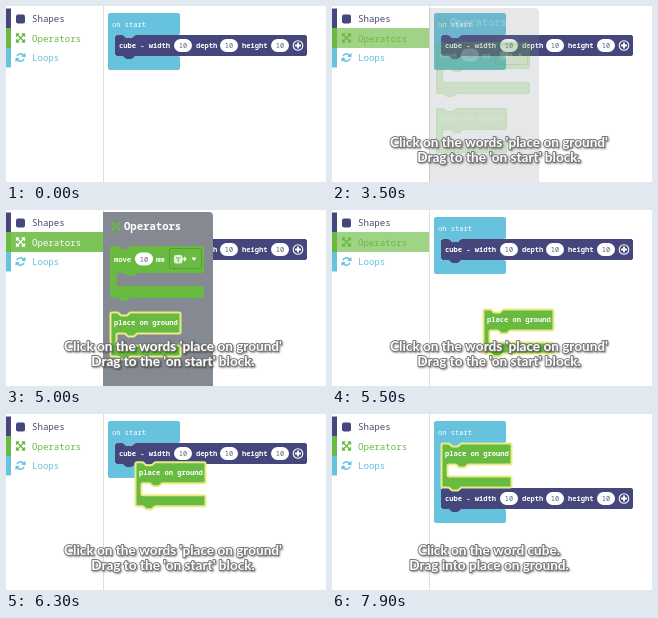
An HTML page with a canvas for the animation above (8 s loop, 320 by 176 pixels).

```html
<!DOCTYPE html>
<html lang="en">
<head>
<meta charset="utf-8">
<title>Block coding lesson</title>
<style>
html, body { margin: 0; width: 100%; height: 100%; overflow: hidden; background: #fff; }
canvas { display: block; width: 320px; height: 176px; }
</style>
</head>
<body>
<canvas id="stage"></canvas>
<script>
const LOOP = 8000;
const NAVY = '#45477c', GREEN = '#69ba40', CYAN = '#66c2dd', YELLOW = '#e9ec86';
const MONO = '"Noto Sans Mono", "DejaVu Sans Mono", monospace';
const canvas = document.getElementById('stage');
const ctx = canvas.getContext('2d');
const dpr = window.devicePixelRatio || 1;
canvas.width = 320 * dpr;
canvas.height = 176 * dpr;

// time, x, y of the dragged block
const DRAG = [
  [5150, 104, 102], [5300, 130, 103], [5500, 151, 99], [6000, 135, 62],
  [6400, 127, 43], [6800, 119, 29], [7050, 117, 29], [7120, 109, 29]
];

const ramp = (t, a, b) => Math.min(1, Math.max(0, (t - a) / (b - a)));
const mix = (a, b, k) => a + (b - a) * k;

function along(keys, t) {
  for (let i = 1; i < keys.length; i++) {
    const [t0, x0, y0] = keys[i - 1], [t1, x1, y1] = keys[i];
    if (t < t1) {
      const k = ramp(t, t0, t1);
      return [mix(x0, x1, k), mix(y0, y1, k)];
    }
  }
  return keys[keys.length - 1].slice(1);
}

function faded(alpha, draw) {
  if (alpha <= 0) return;
  ctx.save();
  ctx.globalAlpha = alpha;
  draw();
  ctx.restore();
}

function text(s, x, y, size, color, weight = 500, align = 'left') {
  ctx.font = `${weight} ${size}px ${MONO}`;
  ctx.textAlign = align;
  ctx.fillStyle = color;
  ctx.fillText(s, x, y);
}

function rect(x, y, w, h, color, r = 0) {
  ctx.fillStyle = color;
  ctx.beginPath();
  ctx.roundRect(x, y, w, h, r);
  ctx.fill();
}

function lines(color, width, ...paths) {
  ctx.strokeStyle = color;
  ctx.lineWidth = width;
  ctx.beginPath();
  for (const [first, ...rest] of paths) {
    ctx.moveTo(...first);
    for (const p of rest) ctx.lineTo(...p);
  }
  ctx.stroke();
}

function roundedPath(pts, r) {
  const last = pts[pts.length - 1];
  ctx.beginPath();
  ctx.moveTo((last[0] + pts[0][0]) / 2, (last[1] + pts[0][1]) / 2);
  pts.forEach((p, i) => ctx.arcTo(...p, ...pts[(i + 1) % pts.length], r));
  ctx.closePath();
}

const notch = (x, y) => [[x + 8, y], [x + 11, y + 3], [x + 17, y + 3], [x + 20, y]];

// A block; with a mouth it becomes a C that wraps other blocks.
function block(x, y, w, top, color, { mouth = 0, foot = 0, joins = true, edge = color } = {}) {
  const arm = x + 7, lip = y + top, jaw = lip + mouth, end = jaw + foot;
  const left = x + .5, right = x + w - .5;
  const pts = [[left, y + .5], ...(joins ? notch(x, y + .5) : []), [right, y + .5]];
  if (mouth) {
    pts.push([right, lip - .5], ...notch(arm, lip - .5).reverse(),
      [arm - .5, lip - .5], [arm - .5, jaw + .5], [right, jaw + .5]);
  }
  pts.push([right, end - .5], ...(joins ? notch(x, end - .5).reverse() : []), [left, end - .5]);
  roundedPath(pts, 1.5);
  ctx.fillStyle = color;
  ctx.fill();
  ctx.strokeStyle = edge;
  ctx.lineWidth = edge === color ? 1 : 2;
  ctx.stroke();
}

function pill(cx, cy) {
  rect(cx - 9, cy - 6.5, 18, 13, '#fff', 6.5);
  text('10', cx, cy + 2.5, 7, '#5b5d78', 500, 'center');
}

function startBlock(mouth) {
  block(102, 7, 72, 22, CYAN, { mouth, foot: 14, joins: false });
  text('on start', 106, 20.5, 7.1, '#fff');
}

function cubeBlock(y) {
  block(109, y, 192, 21, NAVY);
  const base = y + 13, cy = y + 10.5;
  text('cube - width', 113, base, 7.1, '#fff', 600);
  text('depth', 190, base, 7.1, '#fff', 600);
  text('height', 236, base, 7.1, '#fff', 600);
  for (const x of [177, 223, 274]) pill(x, cy);
  ctx.beginPath();
  ctx.arc(292, cy, 4.8, 0, 7);
  ctx.strokeStyle = '#fff';
  ctx.lineWidth = 1.1;
  ctx.stroke();
  lines('#fff', 1.8, [[289, cy], [295, cy]], [[292, cy - 3], [292, cy + 3]]);
}

function placeBlock(x, y, selected) {
  block(x, y, 71, 22, GREEN, { mouth: 11, foot: 12, edge: selected ? YELLOW : GREEN });
  text('place on ground', x + 4, y + 13, 7.1, '#fff', 600);
}

function moveBlock() {
  block(104, 36, 94, 27, GREEN, { mouth: 13, foot: 12 });
  text('move', 108, 51.5, 7.1, '#fff', 600);
  pill(138, 49);
  text('mm', 150, 51.5, 7.1, '#fff', 600);
  ctx.beginPath();
  ctx.roundRect(163.5, 38.5, 32, 20, 2);
  ctx.strokeStyle = '#569d35';
  ctx.lineWidth = 1;
  ctx.stroke();
  rect(168, 45, 8.5, 8.5, '#e4f2dc', 2);
  lines(GREEN, 1, [[170, 47.5], [172.3, 48.5], [174.6, 47.5]], [[172.3, 48.5], [172.3, 52]]);
  lines('#fff', 1.2, [[175, 49], [180, 49]], [[178, 47], [180, 49], [178, 51]]);
  ctx.fillStyle = '#fff';
  ctx.beginPath();
  ctx.moveTo(185.5, 47.5);
  ctx.lineTo(190.5, 47.5);
  ctx.lineTo(188, 51);
  ctx.fill();
}

function crossArrows(x, y, r, color) {
  const paths = [];
  for (const sx of [-1, 1]) for (const sy of [-1, 1]) {
    const p = (a, b) => [x + sx * a * r, y + sy * b * r];
    paths.push([p(0, 0), p(.9, .9)], [p(.3, .95), p(.95, .95), p(.95, .3)]);
  }
  lines(color, 1.3, ...paths);
}

function loopArrows(x, y, color) {
  ctx.strokeStyle = color;
  ctx.lineWidth = 1.5;
  for (const turn of [0, Math.PI]) {
    ctx.beginPath();
    ctx.arc(x, y, 3.7, turn + .35, turn + 2.8);
    ctx.stroke();
    const s = turn ? -1 : 1;
    lines(color, 1.5, [[x - s * 4.4, y + s * 4], [x - s * 4.2, y + s * .9], [x - s * 1.4, y + s * 1.6]]);
  }
}

function sidebar(glow) {
  rect(97, 0, 1, 176, '#dedede');
  rect(0, 2.5, 5, 19.5, NAVY);
  rect(0, 22, 5, 20, GREEN);
  rect(0, 42, 5, 19.5, CYAN);
  faded(glow, () => rect(0, 22, 97, 20, GREEN));
  const ink = glow > .7 ? '#fff' : GREEN;
  rect(10, 8.5, 9, 9, NAVY, 2);
  crossArrows(14.5, 32, 4.2, ink);
  loopArrows(14.5, 51.5, CYAN);
  text('Shapes', 26, 16, 9.1, '#484a70');
  text('Operators', 26, 35.5, 9.1, ink);
  text('Loops', 26, 54.8, 9.1, CYAN);
}

function trash() {
  rect(33, 55, 26, 4, CYAN, 1);
  rect(35, 60, 22, 19, CYAN, 2);
  for (const x of [39, 45, 51]) rect(x, 62, 2, 14, '#fff', 1);
}

function flyout() {
  rect(97, 2, 110, 180, '#858a92', [0, 4, 0, 0]);
  crossArrows(110, 16.5, 3.7, GREEN);
  text('Operators', 118, 20, 10.6, '#fff', 700);
  moveBlock();
  placeBlock(104, 102, false);
}

function caption(rows, cx) {
  ctx.font = 'bold 13.6px Lato, "Open Sans", sans-serif';
  ctx.textAlign = 'center';
  rows.forEach((row, i) => {
    const y = 140.5 + i * 15;
    ctx.save();
    ctx.shadowColor = 'rgba(0,0,0,.45)';
    ctx.shadowBlur = 2 * dpr;
    ctx.shadowOffsetX = ctx.shadowOffsetY = dpr;
    ctx.strokeStyle = '#777';
    ctx.lineWidth = 1.8;
    ctx.strokeText(row, cx, y);
    ctx.restore();
    ctx.fillStyle = '#fff';
    ctx.fillText(row, cx, y);
  });
}

function draw(t) {
  ctx.setTransform(dpr, 0, 0, dpr, 0, 0);
  ctx.lineJoin = 'round';
  ctx.fillStyle = '#fff';
  ctx.fillRect(0, 0, 320, 176);

  sidebar(.5 * ramp(t, 2850, 3300) + .37 * ramp(t, 3450, 3600) - .87 * ramp(t, 5300, 6050));
  faded(.18 * ramp(t, 6400, 6700) * (1 - ramp(t, 6900, 7150)), trash);

  const open = t >= 6400;
  startBlock(open ? 66 : 21);
  cubeBlock(open ? 74 : 29);
  if (open && t < 7120) block(109, 29, 71, 22, '#bcc6c8', { mouth: 11, foot: 12 });

  faded(ramp(t, 3450, 3700) * (1 - ramp(t, 5220, 5420)), flyout);
  if (t >= 5000) placeBlock(...along(DRAG, t), true);

  faded(ramp(t, 20, 300) * (1 - ramp(t, 7050, 7300)), () =>
    caption(["Click on the words 'place on ground'", "Drag to the 'on start' block."], 167));
  faded(ramp(t, 7300, 7600), () =>
    caption(['Click on the word cube.', 'Drag into place on ground.'], 157));
}

const begin = performance.now();
function frame() {
  draw((performance.now() - begin) % LOOP);
  requestAnimationFrame(frame);
}
frame();
</script>
</body>
</html>
```
